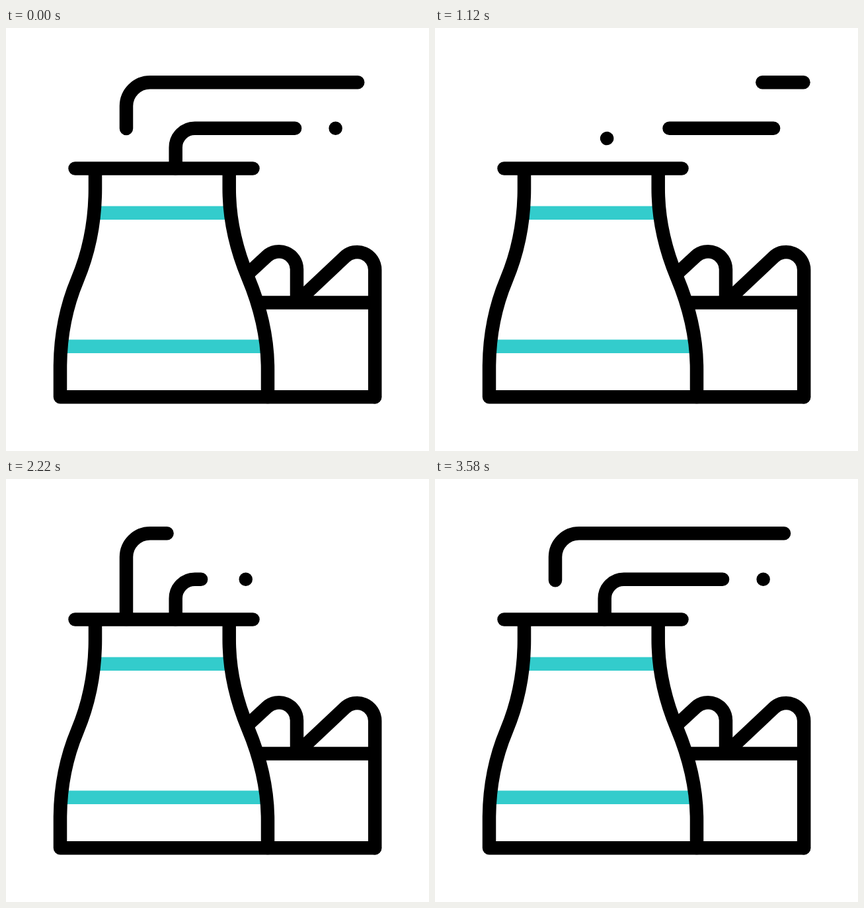
Write an HTML page that moves like this. It is 640 px wide and 640 px high and loops after 3600 ms.

```html
<!DOCTYPE html>
<html>
<head>
<meta charset="utf-8">
<style>
  html, body { margin: 0; height: 100%; overflow: hidden; background: #fff; }
  svg { display: block; width: 100vw; height: 100vh; }
  path { fill: none; stroke: #000; stroke-width: 20.5; stroke-linecap: round; stroke-linejoin: round; }
  .band { stroke: #3cc; stroke-linecap: butt; }
</style>
</head>
<body>
<svg viewBox="0 0 640 640">
  <path class="band" d="M134 279.7H337M84 481.7H394"/>
  <path d="M368 370L394.5 345.5A27 27 0 0 1 440 365V415.5M444 411L512.5 346.5A27 27 0 0 1 558.2 366V558.2M386 415.5H558"/>
  <path d="M135 214V243C135 291 126 338 108 381C90 424 82 468 82 514V558.2H558"/>
  <path d="M337.7 214V243C337.7 291 348 334 366 377C384 420 396 468 396 516V558"/>
  <path d="M104.5 212.5H373.5"/>
  <g id="smoke"></g>
</svg>
<script>
const LOOP = 3600;
const HIGH = 'M182 212V118A36 36 0 0 1 218 82.2H580';
const LOW = 'M256.7 212.3V180.7A29 29 0 0 1 285.7 151.7H580';

// A leg moves a stroke end to a distance along its path by a given time; power > 1 eases out.
const leg = (until, distance, power = 1) => ({ until, distance, power });

function travel(start, ...legs) {
  return t => {
    let from = leg(start, 0);
    for (const to of legs) {
      if (t < to.until) {
        const left = 1 - Math.max(0, t - from.until) / (to.until - from.until);
        return to.distance + (from.distance - to.distance) * left ** to.power;
      }
      from = to;
    }
    return from.distance;
  };
}

const drift = travel(655, leg(4255, 354.5));
const plumes = [
  { d: HIGH, born: 1460, dies: 4845,
    head: travel(1460, leg(2130, 157, 3), leg(LOOP, 464.5), leg(4845, 490, 2)),
    tail: travel(2685, leg(LOOP, 60), leg(4160, 148), leg(4845, 490)) },
  { d: LOW, born: 1380, dies: 5280,
    head: travel(1380, leg(LOOP, 228.5), leg(5280, 341)),
    tail: travel(LOOP, leg(4640, 118), leg(5280, 341)) },
  { d: LOW, born: 655, dies: 4255, head: drift, tail: drift }
];

function addPath(d) {
  const path = document.createElementNS('http://www.w3.org/2000/svg', 'path');
  path.setAttribute('d', d);
  return document.getElementById('smoke').appendChild(path);
}

// Two copies of each plume, one loop apart, so that lives can overlap.
const strokes = plumes.flatMap(p => [0, LOOP].map(shift => ({ ...p, shift, path: addPath(p.d) })));

function draw(now) {
  for (const { born, dies, head, tail, shift, path } of strokes) {
    const t = now % LOOP + shift;
    const start = tail(t);
    path.style.display = t >= born && t < dies ? '' : 'none';
    path.style.strokeDasharray = `${Math.max(0.01, head(t) - start)} 2000`;
    path.style.strokeDashoffset = -start;
  }
}

let origin;
function frame(now) {
  origin ??= now;
  draw(now - origin);
  requestAnimationFrame(frame);
}
draw(0);
requestAnimationFrame(frame);
</script>
</body>
</html>
```
